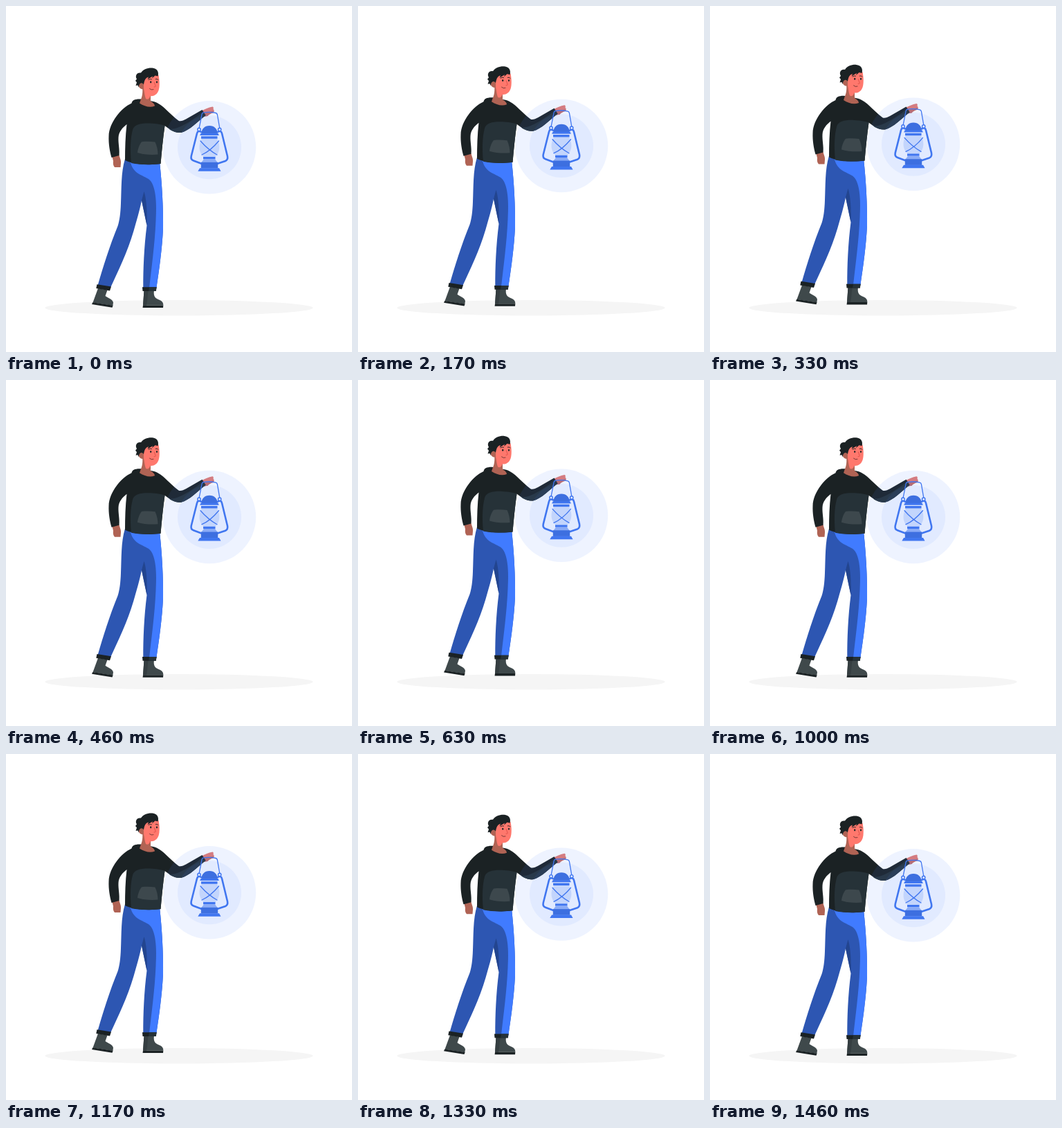
Recreate the animation shown at these times as an HTML page. Size 500x500 px, loop 1.5 s.

```html
<!DOCTYPE html>
<html lang="en">
<head>
<meta charset="utf-8">
<title>Lantern walk</title>
<style>
  html, body { margin: 0; width: 100%; height: 100%; overflow: hidden; background: #fff; }
  svg { display: block; width: 100vw; height: 100vh; }
  .black { fill: #1b2224; }
  .slate { fill: #263238; }
  .blue { fill: #407bff; }
  .navy { fill: #2d56b2; }
  .skin { fill: #ff786d; }
  .tan { fill: #b06354; }
  .shoe { fill: #3f494b; }
  .lamp { fill: #4076f0; }
  .line { fill: none; stroke: #4076f0; stroke-linecap: round; stroke-linejoin: round; }
</style>
</head>
<body>
<svg viewBox="0 0 500 500">
  <ellipse cx="250" cy="436.2" rx="193.5" ry="11.2" fill="#f5f5f5"/>
  <g id="figure">
    <!-- shoes -->
    <path class="shoe" d="M133 408L146.500 410.500L143.500 419C147 422 154 423.500 155 428.500L154.300 433L125.500 428.500Z"/>
    <path class="black" d="M125.300 428.300L154.600 432.800L153.500 435.700L124 431Z"/>
    <path class="shoe" d="M199.500 411H214C213 418 214.500 421.500 220 424C225 426 227.300 427.500 227.300 432.500H198Z"/>
    <path fill="#353e41" d="M199.500 411H206C204 418 205 424 203 432.500H198Z"/>
    <path class="black" d="M198 432.500H227.300L227 436H197.600Z"/>

    <!-- trousers -->
    <path class="navy" d="M172 221C166 240 167 265 166 285C165.500 300 164 310 161.500 318C150 346 140 378 132.500 404L151 407C162 383 175 357 184.500 325C189 309 193 296 196 281L203.500 317C199.500 348 198.200 380 198.300 408H217.300C221.500 380 225.500 352 227 322C227.500 292 225.500 258 222 225Z"/>
    <path class="blue" d="M179.500 223C182 241 194 243 206 250C217 258 218 285 216.500 310C215 345 210 380 207 408H217.300C221.500 380 225.500 352 227 322C227.500 292 225.500 258 222 225Z"/>
    <path fill="#23458f" d="M199.500 268C203 279 204.200 298 203.500 317L196 281Z"/>
    <path class="black" d="M131.500 402.300L152 405.500L150 411.500L130.300 408Z"/>
    <path class="black" d="M197 406.300H217.500L216.800 412H197.500Z"/>
    <path class="slate" d="M207 406.300H217.500L216.800 412H206Z"/>

    <!-- hands -->
    <path class="tan" d="M153 216L163.500 215C164 219 166.500 222 166 227L165.500 233L157 233C155 231 154.500 228 155 224Z"/>
    <path fill="#e27c74" d="M281 153C286 149 293 146.500 298.500 145.500C300 146 300 148 299.500 149C301 150 301 152.500 300 153.500C297 155.500 293 156.500 291.500 159L285 160Z"/>
    <path fill="#c06c69" d="M284 155.500C289 154 294 153 300 151.500C301 153 300 154 299 154.500C295 155.500 293 157 291.500 159L285 160Z"/>

    <!-- sweater -->
    <path class="black" d="M181.500 140.500C182 136 187 134 195 134.500L213 138C218 139 224 143 229 147.500C236 154 243 161 249 165.500C252 167.500 256 165.500 260 163.500L283.500 150L288.500 158C277 167 265 180 253 183C244 184 236 178 229.500 173C227 190 225 210 223.500 228C210 230.300 185 229.500 172 223C172 205 172.500 188 174.500 171C168 176 163 182 162.500 190C162 199 164.500 207 163.500 216L152.500 219C150 210 148 199 148.500 188C149 168 167 147 181.500 140.500Z"/>
    <path class="slate" d="M181 227C179 207 180 190 183 179C185 171 196 169 208 169.500C217 170 225 171 229.500 173C227 190 225 210 223.500 228C210 229.700 195 229.700 181 227Z"/>
    <path class="slate" d="M250 175C262 170 275 161 285 152.500L288.500 158C277 167 265 180 253 183C247 183.500 240 181 236 178C241 178 246 177 250 175Z"/>
    <path fill="#3d484d" d="M196 196.200C203 195.500 209 195.700 215.500 196.500C218 202 219.500 208 219.500 214.500C210 215.500 198 214.500 190 212C190.500 206 193 200 196 196.200Z"/>

    <!-- neck and head -->
    <path class="tan" d="M196 111C198 120 198 129 194.500 136L193 140.500C200 145 208 147.500 215 144.500C215 141.500 212 139.500 209 137.500V125Z"/>
    <path class="skin" d="M199 119C200 124 200.500 130 202 134C205 136 208 134 209 128Z"/>
    <path class="skin" d="M198.500 106C203 98 214 97 220.500 100C222 108 222.300 116 220.500 122C218.500 128 213 131 208 130C201 128 199 120 198 114Z"/>
    <path class="tan" d="M199 113C196 108.500 191 109.500 191 113C191.500 118 195 121 199 120Z"/>
    <path class="black" d="M191.500 117.500L190.500 114.500L187.500 115L189 110.500L187 108L189 105.500C186 101 189 95.500 195 96.500C198 91.500 205 89 211.500 89.500C218 90 221.500 95 219.500 101.500L215.500 100.500L211 104.500L212 101.500L204.500 106L206 102.500C201 104 200 108 199 113.500C196 109.500 192.500 111 191.500 117.500Z"/>
    <g class="black">
      <ellipse cx="209.200" cy="110" rx="1.150" ry="1.400"/>
      <ellipse cx="218" cy="110" rx="1.050" ry="1.400"/>
    </g>
    <g fill="none" stroke-linecap="round">
      <path stroke="#1b2224" stroke-width=".9" d="M206 106.500Q208 104.800 210.500 105.800M216.300 105.600Q218.500 105 220 106.500"/>
      <path stroke="#d84a45" stroke-width=".8" d="M214.300 110.500L216.300 116.200Q215.500 117.300 214 117"/>
      <path stroke="#5a2a2a" stroke-width=".8" d="M207.500 119.500Q210 122 213 120.700"/>
    </g>

    <!-- glow -->
    <g class="blue">
      <circle cx="294" cy="204.300" r="67.200" fill-opacity=".09"/>
      <circle cx="294" cy="204.300" r="46" fill-opacity=".075"/>
    </g>

    <!-- lantern -->
    <path fill="#c3d5fc" d="M283 192H305C310.500 202 309 211 302.500 218H285.500C278.500 211 277.500 202 283 192Z"/>
    <path class="line" stroke-width="1.300" d="M281 195C288 203 296 210 305 215M307.500 195C300 204 292 211 283 215"/>
    <path class="line" stroke-width="1.300" d="M279.200 176L283.200 156Q283.700 154 286 153.800Q294.500 152.500 303 154.500Q305 155 305.400 157L308.700 176"/>
    <path class="line" stroke-width="2.600" d="M282 182C279 180 276.700 181 276 184L267.700 217C267 220.500 268 222.500 271 223.500L283 228M306 182C309 180 311.300 181 312 184L320 217C320.700 220.500 319.500 222.800 317 224L305 228"/>
    <g fill="#e3ecff" stroke="#4076f0" stroke-width="1.400">
      <circle cx="279" cy="178.500" r="2.200"/>
      <circle cx="308.700" cy="178.500" r="2.200"/>
    </g>
    <path fill="#3d6fe0" d="M282.300 184.500C282.500 177.500 287 173 294 173C301 173 305.500 177.500 305.800 184.500Z"/>
    <path class="lamp" d="M281.500 184H306.500L307.800 187H280.200ZM282 188.300H305.500V191.800H282Z"/>
    <path class="lamp" d="M285 218H302.500V221.300H285Z"/>
    <path fill="#8aabf6" d="M286 221.300H302L306 226.500H282Z"/>
    <path fill="#3d6fe0" d="M281.800 225.800H306.200V234.500H281.800Z"/>
    <path class="lamp" d="M280 234.300H308L310.500 238.700H277.300Z"/>
  </g>
</svg>
<script>
  const LOOP = 1500, POSES = 36, LIFT = 10;
  const figure = document.getElementById("figure");
  const start = performance.now();

  // Linear rise and fall at 24 poses per second; the last pose repeats the first.
  function draw(now) {
    const t = Math.max(0, now - start) % LOOP;
    const pose = Math.floor((t + 4) / LOOP * POSES) % POSES;
    const rise = 1 - Math.abs(1 - 2 * pose / (POSES - 1));
    figure.setAttribute("transform", `translate(0 ${-LIFT * rise})`);
    requestAnimationFrame(draw);
  }
  draw(start);
</script>
</body>
</html>
```
